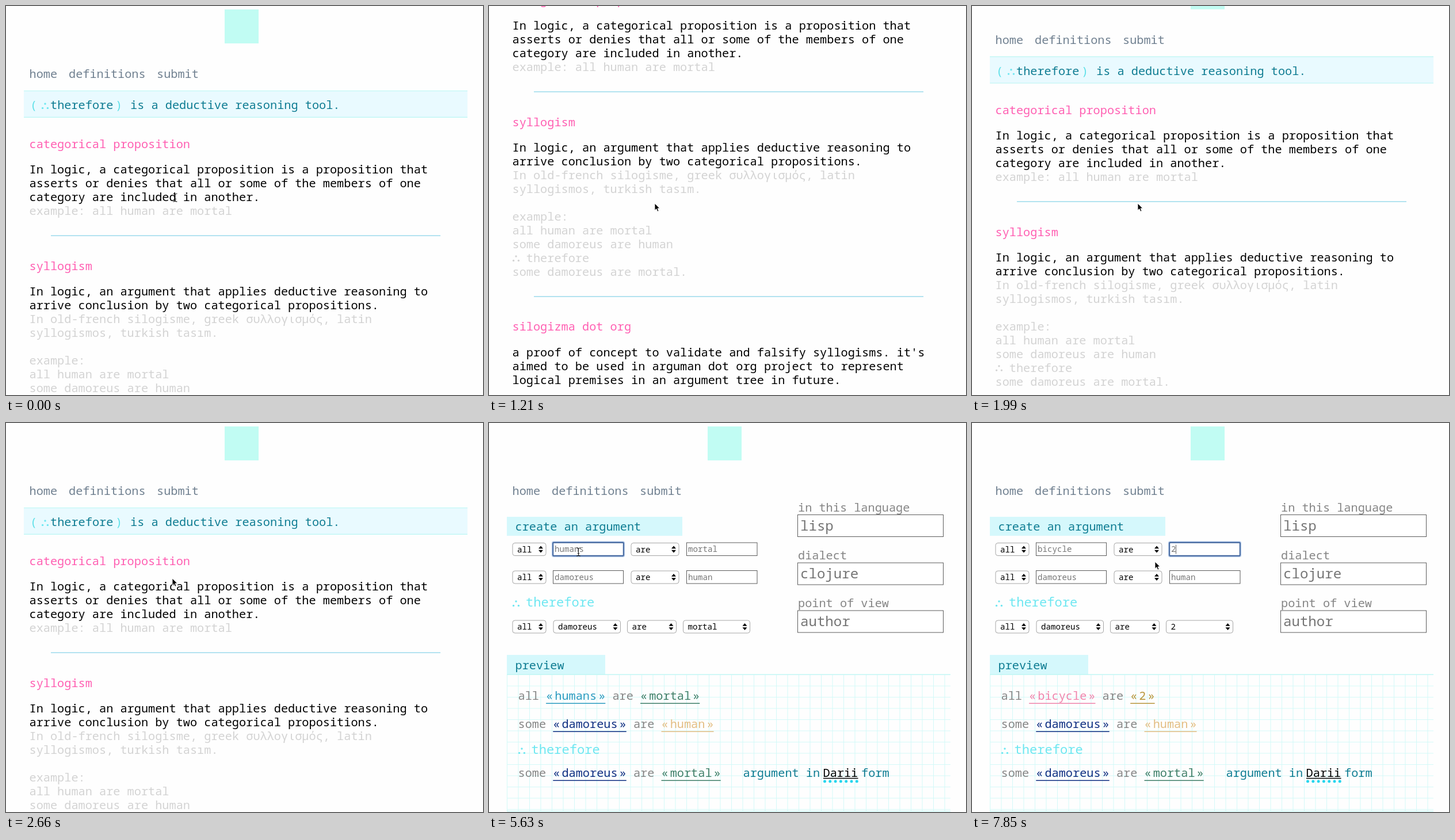
Animation of 829 by 676 pixels, one loop 8 s. Source, as an HTML page:

```html
<!DOCTYPE html>
<html lang="en">
<head>
<meta charset="utf-8">
<title>Deductive reasoning tool</title>
<style>
  html, body { margin: 0; width: 100%; height: 100%; overflow: hidden; background: #fefefe; }
  svg { display: block; width: 829px; height: 676px; }
  text { font: 20.25px "Noto Sans Mono", "DejaVu Sans Mono", monospace; white-space: pre; }
  .slate { fill: #708090; }
  .teal { fill: #0e7c92; }
  .pink { fill: #ff5fb2; }
  .pale { fill: #d3d3d3; font-weight: 500; }
  .gray { fill: #858585; }
  .cyan { fill: #6ee7f1; }
  .big { font-size: 22.1px; font-weight: 500; }
  .field { font-size: 14.15px; }
  .answer { font-size: 24.1px; fill: #757575; }
  .hint { fill: #777; }
  .tab { fill: #d5f8fc; }
  .rule { stroke: #a9dfee; stroke-width: 1.7; }
  .box { fill: #fff; stroke: #5c5c5c; }
  .pick { fill: #fff; stroke: #a6a6a6; }
  .edge { stroke: #b9f6f4; stroke-width: 1.2; }
</style>
</head>
<body>
<svg viewBox="0 0 829 676">
  <defs>
    <g id="dots">
      <circle cx="6" cy="-10" r="1.7"/><circle cx="1.6" cy="-2.6" r="1.7"/><circle cx="10.4" cy="-2.6" r="1.7"/>
    </g>
    <path id="updown" d="M-4-1.3 0-6 4-1.3zM-4 1.3 0 6 4 1.3z"/>
    <pattern id="grid" x="31" y="437" width="19.5" height="19.5" patternUnits="userSpaceOnUse">
      <path d="M0 .5H19.5M.5 0V19.5" stroke="#d3f9f8" fill="none"/>
    </pattern>
  </defs>

  <g id="scroller">
    <rect x="380" y="6" width="59" height="59" fill="#c1fcf3"/>
    <rect id="glow" x="262" y="106" width="74" height="25" fill="#fdfddb"/>
    <text class="slate" x="40.5" y="125">home</text>
    <text class="slate" x="109" y="125">definitions</text>
    <text class="slate" x="262" y="125" id="submit">submit</text>

    <g id="definitions">
      <rect x="31" y="147.5" width="771" height="46" fill="#e9faff"/>
      <path class="edge" d="M31 147.5H802M31 193.3H802"/>
      <g class="cyan">
        <text x="42" y="179" fill="#5ee0e8">(</text>
        <use href="#dots" x="62" y="180"/>
        <text x="190" y="179" fill="#5ee0e8">)</text>
      </g>
      <text class="teal" x="77" y="179">therefore</text>
      <text class="teal" x="216" y="179">is a deductive reasoning tool.</text>
      <g id="prose"></g>
      <use href="#dots" x="41" y="695" fill="#d3d3d3"/>
      <path class="rule" d="M78 399.2H755M78 754.8H755"/>
    </g>

    <g id="form">
      <rect class="tab" x="31" y="163" width="305" height="33"/>
      <text class="teal" x="45.5" y="187">create an argument</text>
      <g id="fields"></g>
      <g class="cyan">
        <use href="#dots" x="41" y="320"/>
        <text class="big" x="64" y="319">therefore</text>
      </g>

      <rect class="tab" x="31" y="403" width="171" height="34"/>
      <text class="teal" x="45.5" y="428">preview</text>
      <rect x="31" y="437" width="771" height="238" fill="url(#grid)"/>
      <path class="edge" d="M31 437H802M31 674.5H802"/>
      <g id="first"></g>
      <g id="others"></g>
      <g class="cyan">
        <use href="#dots" x="51" y="576"/>
        <text class="big" x="73.5" y="575">therefore</text>
      </g>
      <text class="teal" x="441.5" y="615">argument in</text>
      <text x="580.5" y="615">Darii</text>
      <path d="M581 617.5H641.5" stroke="#000" stroke-width="1.4"/>
      <path d="M583.5 622.7H640" stroke="#27d6ee" stroke-width="5" stroke-linecap="round" stroke-dasharray="0 9.3"/>
      <text class="teal" x="647" y="615">form</text>
    </g>
  </g>

  <g id="arrow">
    <path d="M0 0V12.2L2.9 9.6 4.9 14.2 7 13.3 5.1 8.8H8.9Z" fill="#000" stroke="#fff" stroke-width=".9"/>
  </g>
  <g id="beam">
    <path d="M-3.5-7Q0-7 0-5Q0-7 3.5-7M0-5V5M-3.5 7Q0 7 0 5Q0 7 3.5 7M-1.8 2.5H1.8" fill="none" stroke="#222" stroke-width="1.1"/>
  </g>
</svg>

<script>
const LOOP = 8000, ADV = 12.15, SMALL = 8.49;
const $ = id => document.getElementById(id);
const text = (x, y, cls, str, extra = '') => `<text x="${x}" y="${y}" class="${cls}" ${extra}>${str}</text>`;
const show = (id, on) => $(id).setAttribute('visibility', on ? 'visible' : 'hidden');

// Definitions page: first baseline, style, lines
const prose = [
  [247, 'pink', 'categorical proposition'],
  [291, '', 'In logic, a categorical proposition is a proposition that',
    'asserts or denies that all or some of the members of one',
    'category are included in another.'],
  [363, 'pale', 'example: all human are mortal'],
  [459, 'pink', 'syllogism'],
  [503, '', 'In logic, an argument that applies deductive reasoning to',
    'arrive conclusion by two categorical propositions.'],
  [551, 'pale', 'In old-french silogisme, greek συλλογισμός, latin',
    'syllogismos, turkish tasım.', '', 'example:', 'all human are mortal',
    'some damoreus are human', '  therefore', 'some damoreus are mortal.'],
  [814, 'pink', 'silogizma dot org'],
  [859, '', "a proof of concept to validate and falsify syllogisms. it's",
    'aimed to be used in arguman dot org project to represent',
    'logical premises in an argument tree in future.']
];
$('prose').innerHTML = prose.map(([y, cls, ...lines]) =>
  lines.map((s, i) => text(40.5, y + i * 24, cls, s)).join('')).join('');

// Form controls
const select = (x, y, w, str, id = '') =>
  `<rect class="pick" x="${x}" y="${y}" width="${w}" height="22" rx="4"/>` +
  text(x + 8, y + 16, 'field', str, id && `id="${id}"`) +
  `<use href="#updown" x="${x + w - 9}" y="${y + 11}"/>`;
const input = (x, y, w, str, id = '') =>
  `<rect class="box" x="${x}" y="${y}" width="${w}" height="22.5"/>` +
  text(x + 2.5, y + 16, 'field hint', str, id && `id="${id}"`);
const answer = (y, label, str) =>
  text(537, y - 6, 'gray', label) +
  `<rect class="box" x="536.5" y="${y}" width="253" height="38"/>` +
  text(541, y + 27, 'answer', str);

$('fields').innerHTML =
  select(41, 208.5, 58, 'all') + input(111.5, 208, 122, 'humans', 'subject') +
  select(247, 208.5, 83, 'are') + input(343.5, 208, 122.5, 'mortal', 'object') +
  select(41, 257, 58, 'all') + input(111.5, 256.5, 122, 'damoreus') +
  select(247, 257, 83, 'are') + input(343.5, 256.5, 122.5, 'human') +
  select(41, 343, 58, 'all') + select(112, 343, 116.5, 'damoreus') +
  select(240.5, 343, 85, 'are') + select(337.5, 343, 116, 'mortal', 'result') +
  answer(159.5, 'in this language', 'lisp') +
  answer(243, 'dialect', 'clojure') +
  answer(326, 'point of view', 'author') +
  `<g id="focus" fill="none">
     <rect x="110.5" y="207" width="124" height="24.5" rx="2" stroke="#b9cdea" stroke-width="3.4"/>
     <rect x="111.2" y="207.7" width="122.6" height="23.1" rx="1" stroke="#3f639b" stroke-width="1.9"/>
   </g>
   <path id="caret" d="M0 211.5V227.5" stroke="#666"/>`;

// Preview sentences
const term = (x, y, word, color) => {
  const end = x + (word.length + 2) * ADV + 6;
  return `<g fill="${color}">` + text(x, y, '', '«') + text(x + ADV + 3, y, '', word) +
    text(end - ADV, y, '', '»') +
    `<path d="M${x} ${y + 6.3}H${end}" stroke="${color}" stroke-width="1.6"/></g>`;
};
const sentence = (y, quant, a, colorA, b, colorB) => {
  const x = 50.5, xa = x + (quant.length + 1) * ADV, xv = xa + (a.length + 3) * ADV + 6;
  return text(x, y, 'gray', quant) + term(xa, y, a, colorA) +
    text(xv, y, 'gray', 'are') + term(xv + 4 * ADV, y, b, colorB);
};
const NAVY = '#0f2f82', GREEN = '#3f7f68', TAN = '#e3bd82', PINK = '#f084ac', BLUE = '#2a9bc0';
const tints = [BLUE, TAN, GREEN, PINK, '#c19a3c', BLUE, GREEN, PINK];
$('others').innerHTML = sentence(530, 'some', 'damoreus', NAVY, 'human', TAN) +
  sentence(615, 'some', 'damoreus', NAVY, 'mortal', GREEN);

// Timelines; every value holds until the next entry
const scroll = [[0, 0], [150, 42], [300, 130], [440, 208], [590, 258], [760, 263], [910, 265],
  [1210, 250], [1360, 208], [1510, 160.5], [1680, 119], [1830, 86], [1990, 59.3],
  [2160, 36], [2340, 16], [2490, 4], [2640, 0]];
const pointer = [[0, 'beam', 294, 333], [150, 'beam', 288.5, 344], [1210, 'arrow', 288, 343],
  [2640, 'arrow', 289, 270], [2790, 'arrow', 290, 170], [2950, 'arrow', 290, 118],
  [3700, 'arrow', 289, 171], [3850, 'arrow', 282, 178], [4000, 'arrow', 258, 188],
  [4150, 'arrow', 220, 197], [4300, 'arrow', 174, 204], [4440, 'arrow', 128, 209],
  [4590, 'arrow', 90, 211], [4740, 'arrow', 66, 212], [4880, 'arrow', 100, 216],
  [5030, 'beam', 138, 222], [5180, 'beam', 155.5, 224], [5780, 'none', 0, 0],
  [7260, 'arrow', 215, 236], [7400, 'arrow', 285, 245], [7550, 'arrow', 318, 241]];
const strokes = [5780, 6080, 6220, 6520, 6670, 6810, 6960];
const at = (track, t) => track.filter(k => k[0] <= t).pop();

let drawn = '';
function draw(t) {
  const [, shape, px, py] = at(pointer, t);
  $('scroller').setAttribute('transform', `translate(0 ${-at(scroll, t)[1]})`);
  for (const id of ['arrow', 'beam']) {
    $(id).setAttribute('transform', `translate(${px} ${py})`);
    show(id, id === shape);
  }

  const formOpen = t >= 3700, hover = t >= 2950 && t < 3850;
  $('definitions').style.display = formOpen ? 'none' : '';
  $('form').style.display = formOpen ? '' : 'none';
  show('glow', hover);
  $('submit').style.fill = hover ? '#000' : '';

  const typed = strokes.filter(s => s <= t).length, second = t >= 7260, done = t >= 7850;
  const subject = 'bicycle'.slice(0, typed) || 'humans', object = done ? '2' : 'mortal';
  if (drawn !== subject + object) {
    drawn = subject + object;
    $('subject').textContent = subject;
    $('object').textContent = $('result').textContent = object;
    $('first').innerHTML = sentence(481, 'all', subject, tints[typed], object, done ? '#b8963c' : GREEN);
  }

  show('focus', t >= 5180);
  $('focus').setAttribute('transform', `translate(${second ? 232 : 0} 0)`);
  const caret = second ? 346 + done * SMALL : 114.5 + typed * SMALL;
  $('caret').setAttribute('transform', `translate(${caret} 0)`);
  show('caret', t >= 5180 && (t < 5630 || t >= 5780));
}

let start;
function tick(now) {
  start ??= now;
  draw((now - start) % LOOP);
  requestAnimationFrame(tick);
}
draw(0);
requestAnimationFrame(tick);
</script>
</body>
</html>
```
